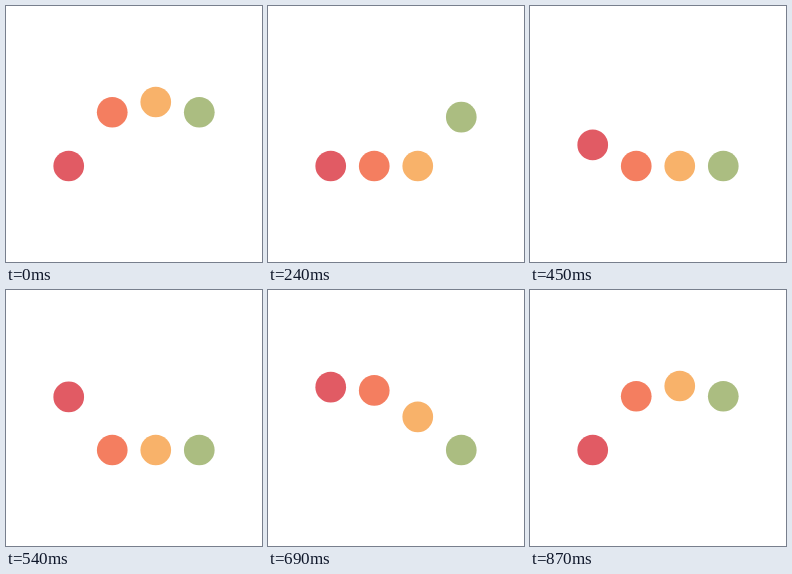
These frames come from a looping animation (256 by 256 pixels, 0.9 s). An HTML page:

```html
<!DOCTYPE html>
<html lang="en">
<head>
<meta charset="utf-8">
<title>Bouncing dots</title>
<style>
  html, body { margin: 0; width: 100%; height: 100%; overflow: hidden; background: #fff; }
  svg { display: block; width: 100vw; height: 100vh; }
</style>
</head>
<body>
<svg viewBox="0 0 100 100">
  <circle cx="24.5" cy="62.5" r="6" fill="#e15b64"/>
  <circle cx="41.5" cy="62.5" r="6" fill="#f47e60"/>
  <circle cx="58.5" cy="62.5" r="6" fill="#f8b26a"/>
  <circle cx="75.5" cy="62.5" r="6" fill="#abbd81"/>
</svg>
<script>
  const LOOP = 900, STEP = 30, CYCLE = LOOP - STEP;
  const TOP = 37.5, HEIGHT = 25;
  const dots = document.querySelectorAll('circle');

  // Closed form of cubic-bezier(.5, 0, 1, .5)
  function fall(u) {
    const s = 2 * Math.sin(Math.asin(u) / 3);
    return s * s * (3 - s) / 2;
  }

  // Each dot is in the air for half a cycle, peaking 1/8 cycle after its neighbour
  function dotY(phase, i) {
    const d = phase - 0.75 - i / 8;
    const fromPeak = Math.abs(d - Math.round(d));
    return TOP + HEIGHT * fall(Math.min(1, fromPeak * 4));
  }

  function draw() {
    const t = Math.floor(performance.now() % LOOP / STEP) * STEP;
    dots.forEach((dot, i) => dot.setAttribute('cy', dotY(t / CYCLE, i)));
    requestAnimationFrame(draw);
  }
  draw();
</script>
</body>
</html>
```
